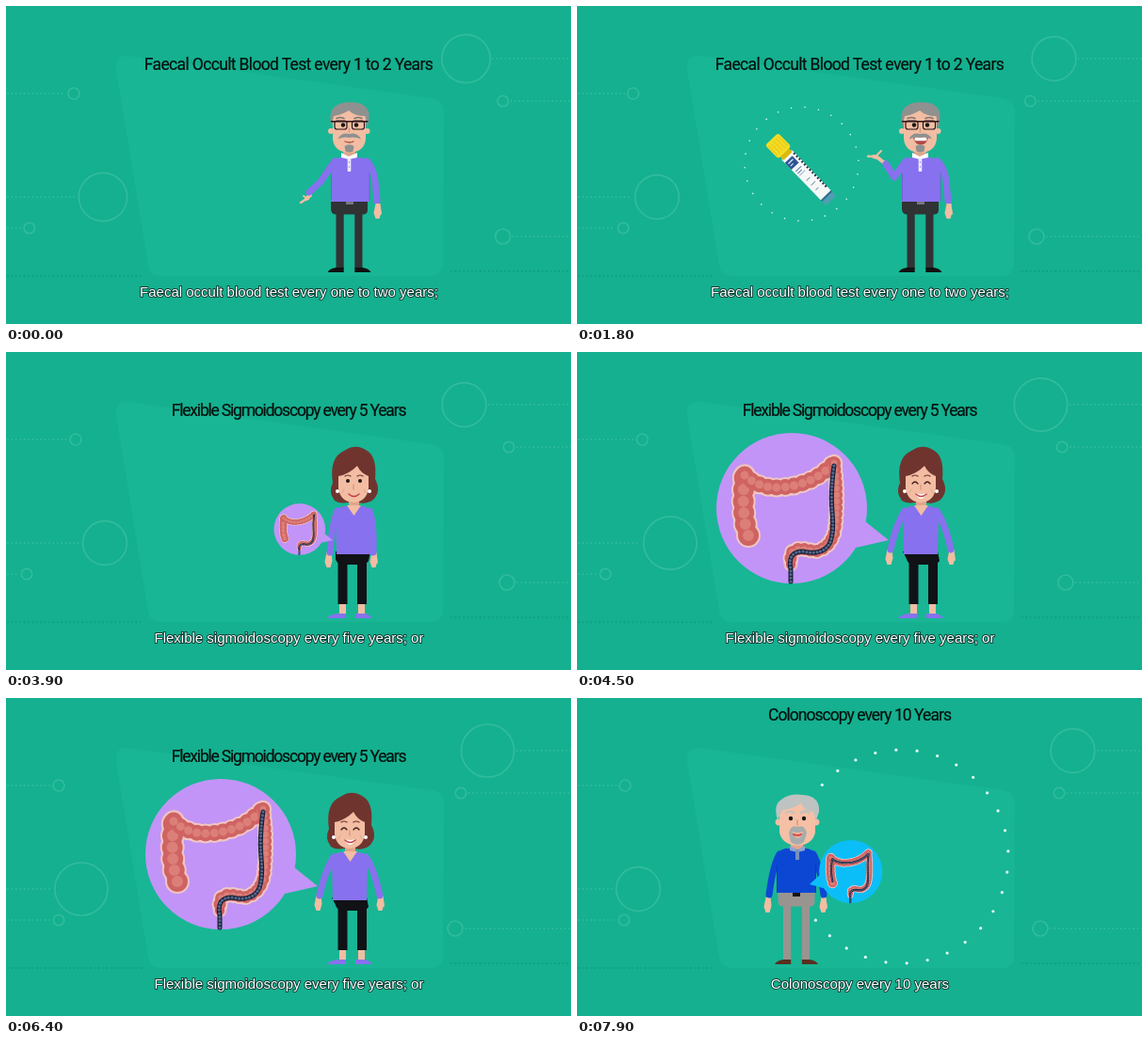
Animation of 600x338 px, one loop 8 s. Source, as an HTML page:

```html
<!DOCTYPE html>
<html lang="en">
<head>
<meta charset="utf-8">
<title>Screening options</title>
<style>
html, body { margin: 0; width: 100%; height: 100%; overflow: hidden; background: #14b08f; }
svg { display: block; width: 100vw; height: 100vh; }
.title { font: 17.5px Roboto, "Liberation Sans", sans-serif; fill: #03110e; stroke: #03110e; stroke-width: .2; text-anchor: middle; }
.caption { font: 15px "Liberation Sans", Arial, sans-serif; fill: #fff; stroke: #0b3a31; stroke-width: 1.8; stroke-linejoin: round; paint-order: stroke; text-anchor: middle; }
</style>
</head>
<body>
<svg id="stage" viewBox="0 0 600 338"></svg>
<script>
const LOOP = 8000, CUT2 = 3300, CUT3 = 7400;
const SKIN = '#f2bda2', PURPLE = '#8871ee', DARK = '#303234';
const stage = document.getElementById('stage');

const clamp = x => Math.max(0, Math.min(1, x));
const smooth = (a, b, t) => { const p = clamp((t - a) / (b - a)); return p * p * (3 - 2 * p); };
const mix = (a, b, p) => a + (b - a) * p;

// Piecewise linear curve through [time, value] points, extended at the start
function track(points, u) {
  let i = 1;
  while (i < points.length - 1 && u > points[i][0]) i++;
  const [a, x] = points[i - 1], [b, y] = points[i];
  return mix(x, y, (u - a) / (b - a));
}

const line = (d, color, width, extra = '') =>
  `<path d="${d}" fill="none" stroke="${color}" stroke-width="${width}" stroke-linecap="round" stroke-linejoin="round" ${extra}/>`;
const fill = (d, color) => `<path d="${d}" fill="${color}"/>`;
const rect = (x, y, w, h, color, r = 0) =>
  `<rect x="${x}" y="${y}" width="${w}" height="${h}" rx="${r}" fill="${color}"/>`;
const dot = (x, y, r, color) => `<circle cx="${x}" cy="${y}" r="${r}" fill="${color}"/>`;
const group = (transform, body) => `<g transform="${transform}">${body}</g>`;

function dotRing(x, y, r, size, n, turn) {
  let out = '';
  for (let i = 0; i < n; i++) {
    const a = turn + i * 2 * Math.PI / n;
    out += dot(x + r * Math.cos(a), y + r * Math.sin(a), size, '#e4faf3');
  }
  return out;
}

const SMALL_LEFT = [[-.2, 74], [0, 72], [.9, 66], [2.3, 56], [2.8, 53], [3.8, 51]];
const LOW_LEFT = [[-.2, 22], [.9, 37], [2.3, 56], [2.9, 61], [3.8, 50]];
const SMALL_RIGHT = [[-.2, 534], [1.2, 490], [1.7, 481], [2.3, 483], [2.8, 490], [3.8, 512]];
const LOW_RIGHT = [[-.2, 532], [.9, 508], [2.3, 477], [2.8, 478], [3.8, 492]];

function background(u) {
  const tone = '#31bc9c', shade = '#0f9e80';
  const dots = (a, b, y, color = tone) => line(`M${a} ${y}H${b}`, color, 1.8, 'stroke-dasharray="0 4.4"');
  const node = (x, y, r, left) =>
    `<circle cx="${x}" cy="${y}" r="${r}" fill="none" stroke="${tone}" stroke-width="1.7"/>` +
    (left ? dots(2, x - r - 3, y) : dots(x + r + 3, 600, y));
  const big = 24.5 + 3.7 * Math.cos(Math.PI * (u - .4));
  return rect(0, 0, 600, 338, '#14b08f') +
    fill('M130 53L452 98Q465 100 465 113L464 275Q463 287 451 287H164Q153 287 151 276L117 68Q115 52 130 53Z', '#18b695') +
    node(track(SMALL_LEFT, u), 93, 6, true) +
    node(103 - 10 * u, 203, big, true) +
    node(track(LOW_LEFT, u), 236, 5.7, true) +
    node(488.5 + 10 * u, 56, big, false) +
    node(track(SMALL_RIGHT, u), 101, 5.7, false) +
    node(track(LOW_RIGHT, u), 245, 8, false) +
    dots(2, 143, 287, shade) + dots(473, 600, 282, shade);
}

const words = (title, y, spacing, caption) =>
  `<text class="title" x="300" y="${y + 6.5}" letter-spacing="${spacing}">${title}</text>` +
  `<text class="caption" x="300.5" y="309">${caption}</text>`;

const hangingHand = (x, y, dir) =>
  fill(`M${x - 2.5} ${y}h5l1 9l-2 7h-4l-2 -6Z`, SKIN) + line(`M${x + 2 * dir} ${y + 5}l${dir} 6`, SKIN, 1.8);

function trousers(x, color, shoe) {
  return fill(`M${x - 19.5} 206H${x + 19.5}V217Q${x + 19} 221.5 ${x + 15} 221.5H${x - 15}Q${x - 19} 221 ${x - 19.5} 216Z`, color) +
    rect(x - 14, 218, 8.2, 61, color) + rect(x + 5.8, 218, 8.2, 61, color) +
    fill(`M${x - 23} 283q2 -4 9 -5h8.2v5Z`, shoe) + fill(`M${x + 23} 283q-2 -4 -9 -5h-8.2v5Z`, shoe);
}

function presenter(t) {
  const p = smooth(0, 420, t), talk = t > 380, grey = '#8e9190';
  const ex = mix(334, 337, p), ey = mix(187, 182, p);
  const wx = mix(322, 328, p), wy = mix(198, 168, p);
  const hx = mix(314, 310, p), hy = mix(205, 160, p);
  const hand = line(`M${wx} ${wy}L${hx + 9} ${mix(hy - 4, hy + 1, p)}L${hx + 5} ${hy}`, SKIN, 4) +
    line(`M${hx + 5} ${hy}L${hx - 1} ${mix(hy + 4, hy - .3, p)}`, SKIN, 2.4) +
    line(`M${hx + 7} ${hy}L${mix(hx + 2, hx + 13, p)} ${mix(hy - 3, hy - 6, p)}`, SKIN, 2);
  const body = trousers(364.5, DARK, '#111') + hand +
    line(`M349 165L${ex} ${ey}L${wx} ${wy}`, PURPLE, 7) +
    line('M383 165Q390 171 392 186L394 207', PURPLE, 7) + hangingHand(395, 210, 1) +
    fill('M354 161H376Q386 162 386 171V208H345V171Q345 162 354 161Z', PURPLE) +
    line('M386 178V206M345.5 178V206', '#715bd0', .8) +
    rect(361, 208, 8, 3, '#75777c') + rect(358, 150, 13, 11, '#dfa68b') +
    fill('M356 156l8 4l9 -4v5l-9 2l-8 -2Z', '#fff') + rect(362.7, 162, 3.6, 14, '#efeaff', 1) +
    dot(364.5, 166, .7, PURPLE) + dot(364.5, 171, .7, PURPLE);
  const face = dot(345, 133, 3, SKIN) + dot(383.5, 133, 3, SKIN) +
    fill('M347 113Q364 104 382 113V141Q381 155 364.5 156Q348 155 347 141Z', SKIN) +
    fill('M345.5 129Q342 113 349 107Q356 101 370 102.5Q386 104 385.5 118Q385.5 126 383 130L381.5 117Q370 117 364 111Q356 116 348 117Z', grey) +
    line('M351 119.5q4 -2 8 0M370 119.5q4 -2 8 0', '#777', 1.6) +
    dot(358, 126.5, 2.2, '#171717') + dot(372, 126.5, 2.2, '#171717') +
    `<g fill="none" stroke="#2a1418" stroke-width="1.2"><rect x="349" y="122" width="13" height="9" rx="2.5"/><rect x="367.5" y="122" width="13" height="9" rx="2.5"/></g>` +
    line('M345.5 122.7H384', '#2a1418', 1.5) +
    line('M364.5 130v4', '#d8977c', 1.4) +
    (talk ? fill('M357 140H373Q371 147.5 365 147.5Q359 147.5 357 140Z', '#b04a44') +
      rect(358.5, 140, 13, 3.2, '#fff', 1) : '') +
    fill('M352.5 141.5Q356 134 364.5 136Q373 134 377 141.5Q370 138.5 364.5 140Q359 138.5 352.5 141.5Z', grey) +
    (talk ? '' : line('M360 144q5 2 9 0', '#a24c3f', 1.3)) +
    fill('M359.5 149Q364.5 145.5 369.5 149L368.5 154.5Q364.5 156.5 360.5 154.5Z', grey);
  return body + face;
}

function sampleTube() {
  let body = rect(-7.5, -25, 15, 60, '#f5f8f7', 1) + rect(-7.5, 35, 15, 8, '#4f9fb0', 2) +
    rect(-7.5, 35, 15, 2, '#3a6a92') +
    rect(-7.5, -20, 11, 10, '#2d5492') + rect(-5.5, -17.5, 7, 1.3, '#d7e6ff') + rect(-5.5, -14, 4, 1.2, '#d7e6ff') +
    rect(-5.5, -6, 8, 1.2, '#6585b2') + rect(-5.5, -3, 6, 1.2, '#6585b2') + rect(-5.5, 0, 8, 1, '#a6b5c4') +
    rect(-4, 9, 5, 1, '#8698a9') + rect(-4, 16, 6, 1, '#8698a9') + rect(-4, 23, 4, 1, '#8698a9') +
    rect(-6.5, -30, 13, 7, '#d9b90c') + rect(-9.5, -48, 19, 20, '#f5dc24', 3);
  for (let i = 0; i < 13; i++) body += rect(5.5, -21 + i * 4, 2.2, 1.8, '#20293b');
  for (let i = 0; i < 5; i++) body += rect(-8 + i * 3.7, -45, 1, 14, '#e3c718');
  return body;
}

function sceneOne(t) {
  const p = smooth(300, 700, t);
  return words('Faecal Occult Blood Test every 1 to 2 Years', 61, -.65, 'Faecal occult blood test every one to two years;') +
    (p ? dotRing(238.5, 168, 60.5 * p, .8, 26, t * 1e-4) +
      group(`translate(240 176) rotate(-44) scale(${p})`, sampleTube()) : '') +
    presenter(t);
}

// Bowel with an instrument, centred on 0,0 for a bubble of radius 80
function bowel(instrument) {
  const right = 'M-46 29Q-54 8 -50 -35', across = 'M-50 -35Q-35 -21 -12 -22Q22 -24 45 -48';
  const left = 'M45 -48Q50 -15 46 22Q42 43 24 46Q2 39 -1 50V60';
  const parts = [[right, 20], [across, 15], [left, 11]];
  const beads = (d, w, size, color) => line(d, color, size, `stroke-dasharray="0 ${w * .62}"`);
  const layer = draw => parts.map(([d, w]) => draw(d, w)).join('');
  return layer((d, w) => line(d, '#e9b9c4', w + 4) + beads(d, w, w + 6, '#f0c6c4')) +
    layer((d, w) => line(d, '#c95a5c', w - 1)) +
    layer((d, w) => beads(d, w, w + 2, '#cf6362') + beads(d, w, w * .6, '#dc7f79')) +
    line(instrument, '#1b2238', 5) +
    line(instrument, '#56688b', 3, 'stroke-dasharray=".1 3.6"');
}

const SCOPE = 'M-1 78V65Q-5 46 12 46Q34 51 41 36Q45 25 43 4Q41 -18 45 -45';
const FULL_SCOPE = SCOPE + 'Q22 -23 -12 -22Q-35 -22 -47 -32Q-52 0 -46 25';

// Speech bubble that grows out of its tail tip
const bubble = (tipX, tipY, cx, cy, scale, color, tail, scope) =>
  group(`translate(${tipX} ${tipY}) scale(${scale}) translate(${cx} ${cy})`,
    fill(tail, color) + dot(0, 0, 80, color) + bowel(scope));

function woman(t) {
  const p = smooth(3900, 4300, t), happy = t > 4300, x = 369 - 4 * p;
  const lx = mix(343, 332, p), rx = mix(391, 398, p), hy = mix(213, 210, p);
  const legs = rect(354, 262, 7, 17, SKIN) + rect(374, 262, 7, 17, SKIN) +
    fill('M341 283Q344 279 352 278H361V283Z', PURPLE) + fill('M389 283Q386 279 381 278H371V283Z', PURPLE) +
    rect(352.5, 220, 10, 48, '#101216') + rect(373, 220, 10, 48, '#101216') +
    fill(`M${x - 19} 212H${x + 18}L385 222Q383 226 374 226H357Q351 225 350 220Z`, '#101216');
  const hair = fill(`M${x - 20} 158Q${x - 27} 149 ${x - 22} 139Q${x - 26} 112 ${x - 10} 105Q${x + 3} 96 ${x + 16} 106Q${x + 25} 113 ${x + 23} 135Q${x + 30} 148 ${x + 21} 157Q${x + 11} 164 ${x} 158Q${x - 12} 163 ${x - 20} 158Z`, '#70342f');
  const eyes = happy
    ? line(`M${x - 9} 140q3 -4 6 0M${x + 4} 140q3 -4 6 0`, '#47201e', 1.3)
    : dot(x - 6, 137, 2, '#241818') + dot(x + 7, 137, 2, '#241818');
  return legs + hangingHand(lx, hy, -1) + hangingHand(rx, hy, 1) +
    line(`M${x - 17} 169Q${mix(346, 339, p)} 183 ${lx + 1} ${hy}`, PURPLE, 7) +
    line(`M${x + 17} 169Q${mix(391, 391, p)} 182 ${rx - 1} ${hy}`, PURPLE, 7) +
    fill(`M${x - 11} 164H${x + 11}Q${x + 20} 166 ${x + 19} 176L${x + 18} 215H${x - 18}L${x - 19} 176Q${x - 20} 166 ${x - 11} 164Z`, PURPLE) +
    hair + rect(x - 5, 152, 11, 13, '#e2a48a') + fill(`M${x - 7} 163H${x + 8}L${x + .5} 174Z`, SKIN) +
    fill(`M${x - 16} 132Q${x - 5} 130 ${x + 4} 121Q${x + 8} 129 ${x + 16} 132V145Q${x + 14} 159 ${x} 160Q${x - 14} 159 ${x - 16} 145Z`, SKIN) +
    line(`M${x - 9} 132q3 -2 6 0M${x + 4} 132q3 -2 6 0`, '#70342f', 1.2) + eyes +
    line(`M${x} 141v5`, '#d79478', 1.2) +
    (happy ? fill(`M${x - 5} 150Q${x} 152 ${x + 6} 150Q${x + 4} 156 ${x} 156Q${x - 4} 155 ${x - 5} 150Z`, '#fff') : '') +
    line(`M${x - 5} 151q5.5 5 11 0`, '#c33e46', 1.5) +
    line(`M${x - 10} 146l-2 4M${x + 11} 146l2 4`, '#dca080', .8) +
    dot(x - 17, 148, 2, '#fff') + dot(x + 17, 148, 2, '#fff');
}

function sceneTwo(t) {
  const p = smooth(3740, 4150, t), y = mix(-20, 61, smooth(CUT2, 3600, t));
  const tip = mix(347, 331, smooth(3900, 4300, t));
  const pulse = (t - 4700) / 200;
  const sparkle = t > 4700 && t < 5700 ? dotRing(271, 123, 7.5 + Math.sin(pulse), 1.8, 8, .3) : '';
  return words('Flexible Sigmoidoscopy every 5 Years', y, -1.2, 'Flexible sigmoidoscopy every five years; or') +
    woman(t) +
    (p ? bubble(tip, 200, -103, -34, p, '#c294f7', 'M78 14L103 34L68 42Z', SCOPE) : '') + sparkle;
}

function grandfather() {
  const hair = '#bec3c2', blue = '#0c47d4';
  return trousers(233, '#99948f', '#59301f') + rect(229, 207, 8, 4, '#161616') +
    hangingHand(203, 212, -1) + hangingHand(262, 212, 1) +
    line('M215 166Q208 178 204 209', blue, 7) + line('M251 166Q258 178 262 209', blue, 7) +
    fill('M221 160H245Q254 162 254 172V207H212V172Q212 162 221 160Z', blue) +
    line('M212.5 178V206M253.5 178V206', '#0a38a8', .8) +
    rect(227, 150, 13, 12, '#e3a68c') + fill('M226 157l8 4l8 -4v5l-8 2l-8 -2Z', '#8da6ce') + rect(232, 161, 4, 11, '#7890c0') +
    dot(214, 132, 3.4, SKIN) + dot(254, 132, 3.4, SKIN) +
    fill('M215 115Q234 102 253 115V143Q250 156 234 157Q218 156 215 143Z', '#f5c0a5') +
    fill('M213 130Q208 113 217 108Q226 101 240 103Q258 104 257 121L254 130L251 121Q242 121 238 112Q227 119 218 119Z', hair) +
    line('M222 122q5 -3 8 0M238 122q4 -3 8 0', hair, 2.2) +
    dot(227, 128, 2.2, '#181818') + dot(241, 128, 2.2, '#181818') +
    line('M234 130v5', '#d99378', 1.4) +
    fill('M225 144Q227 134 234 137Q242 134 244 144L241 153Q234 159 227 153Z', '#a7adac') +
    fill('M229 142Q234 144 240 142Q239 149 234 149Q230 149 229 142Z', '#f1b49a') +
    line('M230 145q4 2 8 0', '#d54b48', 2);
}

function sceneThree(t) {
  const p = smooth(7740, 8150, t) * 1.23, y = mix(-20, 17, smooth(CUT3, 7700, t));
  return words('Colonoscopy every 10 Years', y, -.96, 'Colonoscopy every 10 years') +
    (t > 7700 ? dotRing(344.5, 168.5, 113.5, 1.6, 32, -.05 + (t - 7900) * 1e-4) : '') +
    grandfather() +
    (p ? bubble(247, 198, 104, -32, p, '#0bbef7', 'M-78 8L-104 32L-68 42Z', FULL_SCOPE) : '');
}

function draw(now) {
  const t = now % LOOP;
  const drift = t < CUT2 ? t / 1000 : (t - 4100) / 1000;
  const scene = t < CUT2 ? sceneOne : t < CUT3 ? sceneTwo : sceneThree;
  stage.innerHTML = background(drift) + scene(t);
  requestAnimationFrame(draw);
}
draw(performance.now());
</script>
</body>
</html>
```
